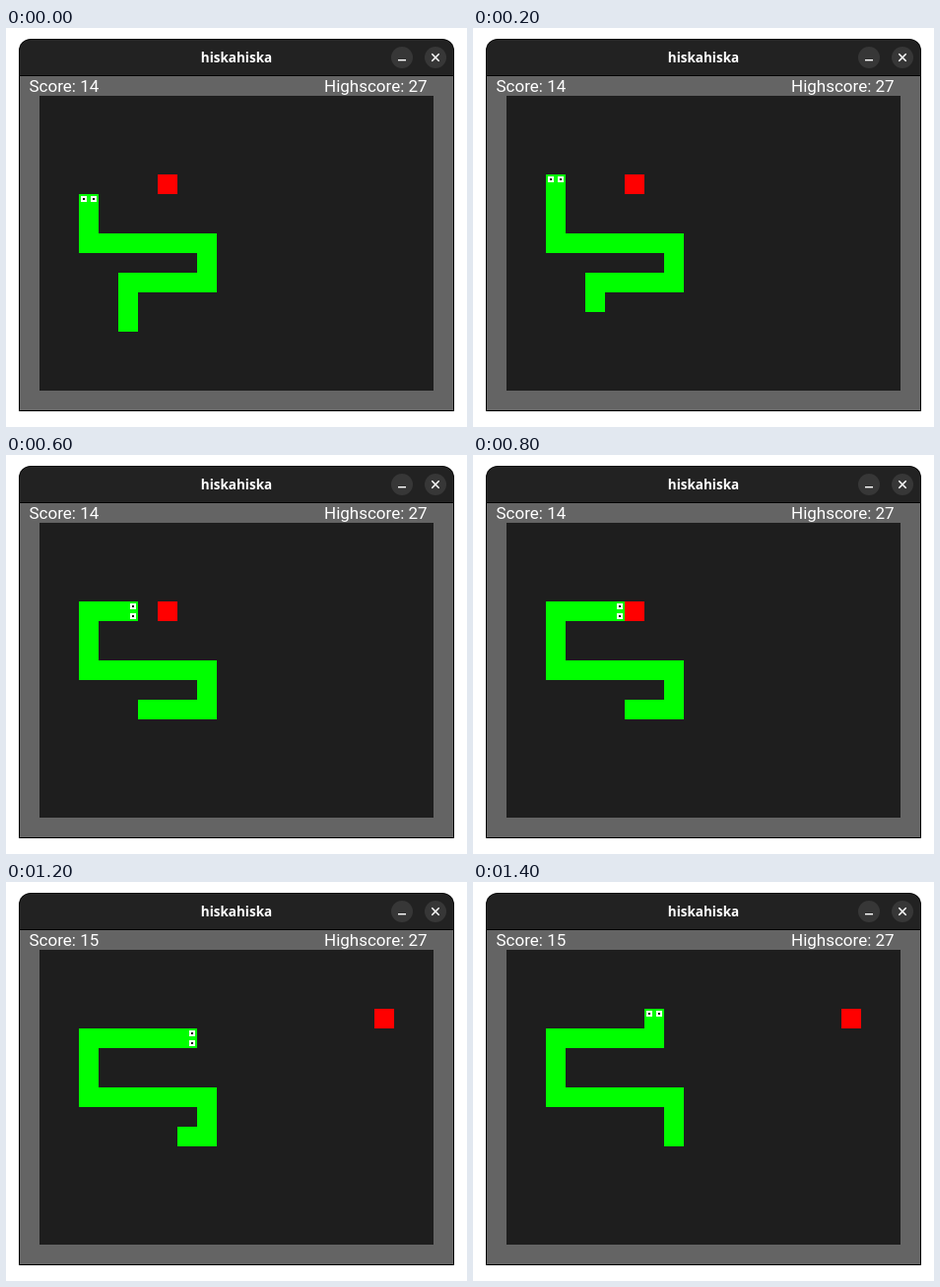
Write an HTML page that moves like this. It is 468 px wide and 406 px high and loops after 1600 ms.

```html
<!DOCTYPE html>
<html lang="en">
<head>
<meta charset="utf-8">
<title>hiskahiska</title>
<style>
  html, body { margin: 0; width: 100%; height: 100%; overflow: hidden; background: #fff; }
  svg { display: block; width: 468px; height: 406px; }
  .title { font: bold 13.5px "Open Sans", "Noto Sans", sans-serif; fill: #fff; text-anchor: middle; }
  .score { font: 17px Roboto, Arial, sans-serif; fill: #fff; }
  .board { shape-rendering: crispEdges; }
</style>
</head>
<body>
<svg viewBox="0 0 468 406">
  <path d="M13 390V23a12 12 0 0 1 12-12H443a12 12 0 0 1 12 12V390z" fill="#000"/>
  <path d="M14 48V23a11 11 0 0 1 11-11H443a11 11 0 0 1 11 11V48z" fill="#222"/>
  <text class="title" x="234" y="35">hiskahiska</text>
  <g fill="#373737">
    <circle cx="402" cy="30" r="11"/>
    <circle cx="436" cy="30" r="11"/>
  </g>
  <rect x="398" y="32" width="8" height="1.4" fill="#fff"/>
  <path d="M432.3 26.3l7.4 7.4m0-7.4l-7.4 7.4" stroke="#fff" stroke-width="1.5"/>

  <rect x="14" y="49" width="440" height="340" fill="#646464"/>
  <text class="score" id="score" x="23.5" y="65">Score: 14</text>
  <text class="score" x="323" y="65">Highscore: 27</text>

  <g class="board" transform="translate(34 69)">
    <rect width="400" height="300" fill="#1e1e1e"/>
    <path id="food" fill="#f00"/>
    <path id="body" fill="#0f0"/>
    <path id="eyes" fill="#fff"/>
    <path id="pupils" fill="#000"/>
  </g>
</svg>
<script>
  const CELL = 20, TICK = 200, TICKS = 8;
  const START_LENGTH = 17, EAT_TICK = 5;
  const MOVES = { U: [0, -1], R: [1, 0], L: [-1, 0] };
  const EYES = { U: [[5, 5], [15, 5]], R: [[15, 5], [15, 15]] };
  const TURNS = "UURRRRUULLLLLLUUURRRRRU";

  const $ = id => document.getElementById(id);
  const square = (x, y, size) => `M${x} ${y}h${size}v${size}h${-size}z`;
  const cell = ([x, y]) => square(x * CELL, y * CELL, CELL);

  // Every cell on the route, from the first tail position to the last head position
  const route = [[4, 11]];
  for (const turn of TURNS) {
    const [x, y] = route[route.length - 1];
    const [dx, dy] = MOVES[turn];
    route.push([x + dx, y + dy]);
  }

  function draw(tick) {
    const eaten = tick >= EAT_TICK ? 1 : 0;
    const head = START_LENGTH - 1 + tick;
    const [hx, hy] = route[head];
    const eyes = EYES[TURNS[head - 1]];
    const marks = size => eyes.map(([x, y]) =>
      square(hx * CELL + x - size / 2, hy * CELL + y - size / 2, size)).join("");

    $("body").setAttribute("d", route.slice(tick - eaten, head + 1).map(cell).join(""));
    $("eyes").setAttribute("d", marks(6));
    $("pupils").setAttribute("d", marks(2));
    $("food").setAttribute("d", cell(eaten ? [17, 3] : [6, 4]));
    $("score").textContent = `Score: ${14 + eaten}`;
  }

  let shown = 0;
  const start = performance.now();

  function frame() {
    const tick = Math.floor((performance.now() - start) / TICK) % TICKS;
    if (tick !== shown) draw(shown = tick);
    requestAnimationFrame(frame);
  }

  draw(0);
  requestAnimationFrame(frame);
</script>
</body>
</html>
```
